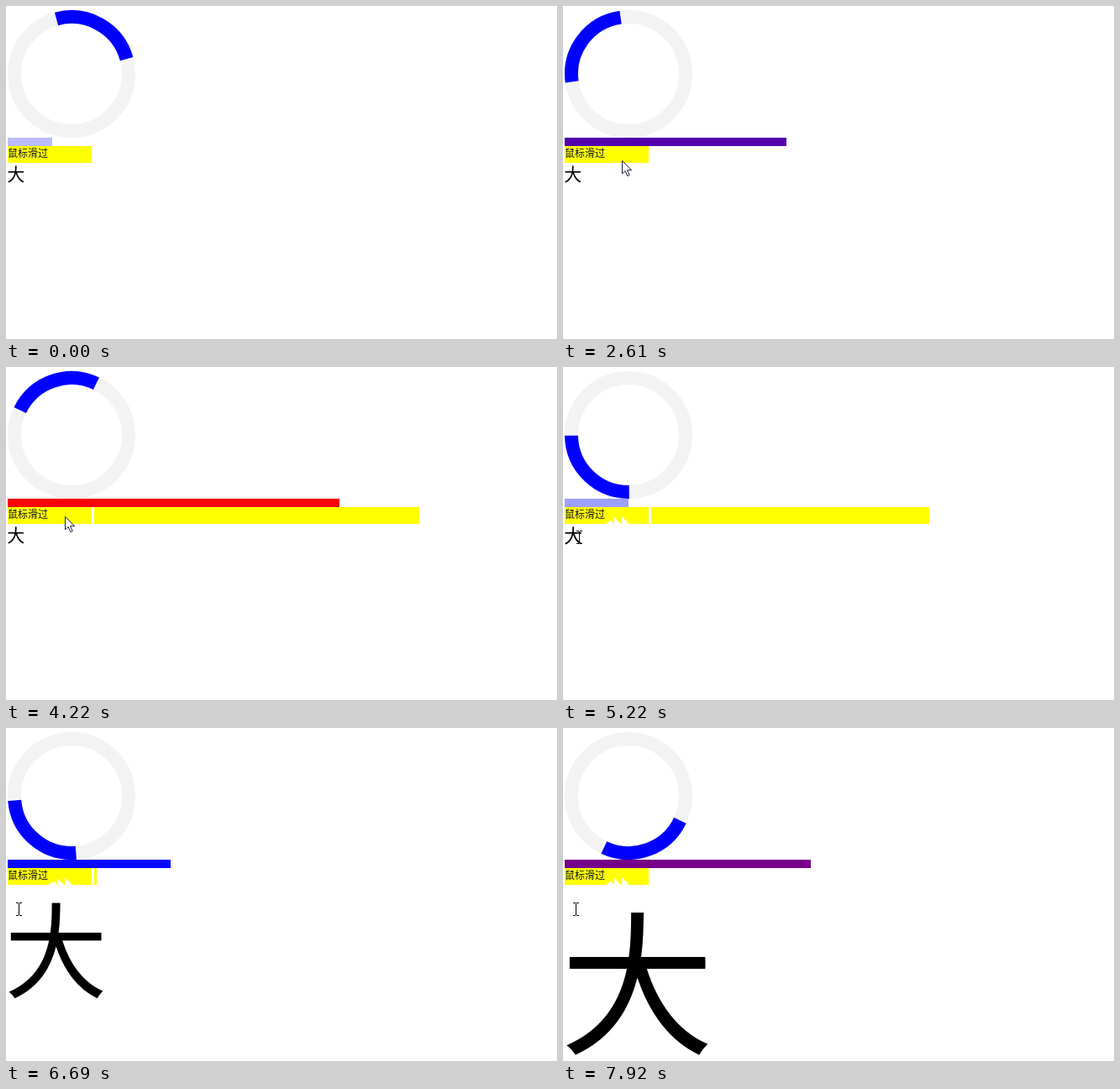
These frames come from a looping animation (656 by 397 pixels, 7990 ms). An HTML page:

```html
<!DOCTYPE html>
<html lang="zh-CN">
<head>
<meta charset="utf-8">
<title>CSS 动画</title>
<style>
html, body { margin: 0; width: 100%; height: 100%; overflow: hidden; background: #fff; }
svg { display: block; }
text { font-family: "Noto Sans CJK SC", "Noto Sans CJK", "Noto Sans SC", sans-serif; }
</style>
</head>
<body>
<svg width="656" height="397" viewBox="0 0 656 397">
  <g fill="none" stroke-width="16">
    <circle cx="78" cy="81" r="68" stroke="#f3f3f3"/>
    <path id="arc" d="M29.92 32.92A68 68 0 0 1 126.08 32.92" stroke="#00f"/>
  </g>
  <rect id="bar" x="2" y="157" height="10"/>
  <rect x="2" y="167" width="100" height="20" fill="#ff0"/>
  <rect id="slide" x="105" y="167" height="20" fill="#ff0"/>
  <path id="trail" d="M50 187l7-4 4 4zM61 187v-8l8 8zM70 187v-9l9 9z" fill="#fff"/>
  <text x="2" y="180" font-size="12" fill="#101030">鼠标滑过</text>
  <text id="big" text-anchor="middle">大</text>
  <path id="arrow" d="M.5 .5v15.5l3.6-3.4 2.7 6 2.4-1-2.7-5.9h5z" fill="#fff" stroke="#1a1a50"/>
  <path id="beam" d="M-3.5 -7.5h3m1 0h3M0 -7v14M-3.5 7.5h3m1 0h3" fill="none" stroke="#000"/>
</svg>
<script>
const LOOP = 7990, TICK = 7.69; // one tick in hundredths of a second
const $ = id => document.getElementById(id);
const [arc, bar, slide, trail, big, arrow, beam] =
  ['arc', 'bar', 'slide', 'trail', 'big', 'arrow', 'beam'].map($);

// Pointer path: tick, x, y
const arrowPath = [[28, 122, 397], [30, 98, 280], [32, 79, 220], [33, 72, 188],
  [34, 70, 184], [37, 70, 178], [63, 70, 178], [65, 46, 188]];
const beamPath = [[66, 27, 201], [68, 19, 203], [82, 19, 203], [86, 15, 216]];

// The CSS "ease" curve, solved for its parameter by bisection
function ease(x) {
  if (x <= 0) return 0;
  if (x >= 1) return 1;
  let lo = 0, hi = 1, u;
  for (let n = 0; n < 24; n++) {
    u = (lo + hi) / 2;
    if (.75 * u * (1 - u) + u ** 3 < x) lo = u; else hi = u;
  }
  return .3 * u * (1 - u) ** 2 + 3 * u * u * (1 - u) + u ** 3;
}

function along(path, k) {
  const next = path.findIndex(p => p[0] > k);
  if (next < 0) return path[path.length - 1].slice(1);
  const a = path[Math.max(next - 1, 0)], b = path[next];
  const f = Math.max(0, (k - a[0]) / (b[0] - a[0]));
  return [1, 2].map(i => Math.round(a[i] + (b[i] - a[i]) * f));
}

function place(el, path, k, visible, shift = 0) {
  const [x, y] = along(path, k);
  el.setAttribute('visibility', visible ? 'visible' : 'hidden');
  el.setAttribute('transform', `translate(${x + shift} ${y})`);
}

// White at 0, blue at 200, red at 400
function barColor(w) {
  const f = w / 200;
  const c = f < 1 ? [1 - f, 1 - f, 1] : [f - 1, 0, 2 - f];
  return `rgb(${c.map(v => Math.round(v * 255))})`;
}

function draw(ms) {
  const k = Math.ceil((Math.floor(ms / 10) + 1) / TICK) - 1;

  arc.setAttribute('transform', `rotate(${29.7 + 18.745 * k} 78 81)`);

  const w = (53 + 6.214 * k) % 400;
  bar.setAttribute('width', Math.round(w));
  bar.setAttribute('fill', barColor(w));

  const open = ease((k - 34.2) / 26) - ease((k - 64.4) / 25.7);
  slide.setAttribute('width', Math.round(397 * open));

  const size = 20 + 180 * ease((k - 67.35) / 63);
  big.setAttribute('font-size', size * 1.05);
  big.setAttribute('x', 2 + size * .493);
  big.setAttribute('y', 187 + size * 1.073);

  trail.setAttribute('visibility', k >= 65 ? 'visible' : 'hidden');
  place(arrow, arrowPath, k, k >= 28 && k < 66);
  place(beam, beamPath, k, k >= 66, .5);
}

const start = performance.now();
function frame() {
  draw((performance.now() - start) % LOOP);
  requestAnimationFrame(frame);
}
frame();
</script>
</body>
</html>
```
